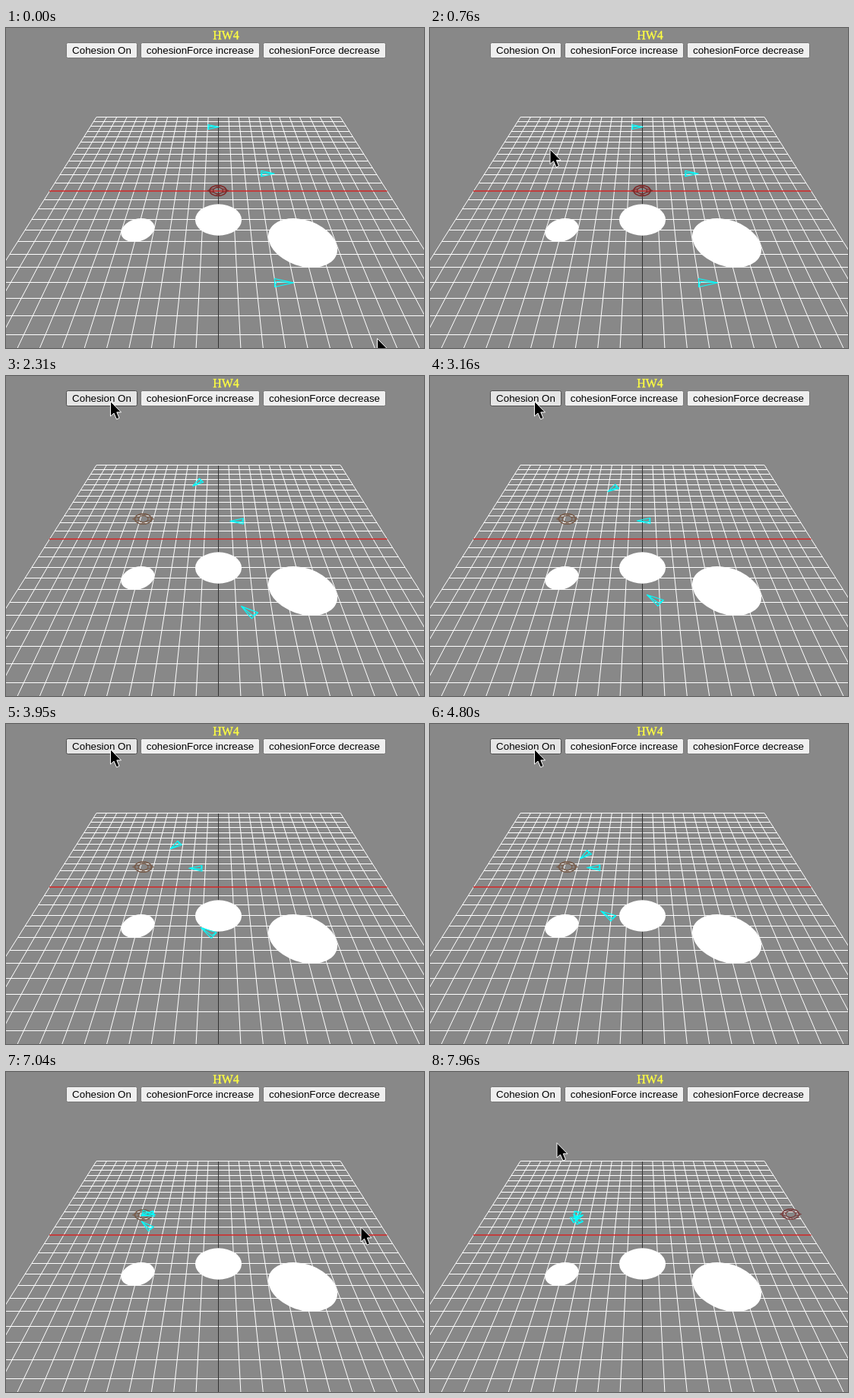
Animation, 550 px wide and 422 px high, one loop 8 s. Source, as an HTML page:

```html
<!DOCTYPE html>
<html>
<head>
<meta charset="utf-8">
<title>HW4</title>
<style>
html, body { margin: 0; width: 100%; height: 100%; overflow: hidden; background: #888; }
svg { display: block; }
.btn text { font: 13.333px "Liberation Sans", Arial, sans-serif; text-anchor: middle; fill: #000; }
.btn rect { fill: #efefef; stroke: #767676; }
.btn.hover rect { fill: #e5e5e5; stroke: #4f4f4f; }
.btn.active rect { fill: #f5f5f5; stroke: #8d8d8d; }
</style>
</head>
<body>
<svg width="550" height="422" viewBox="0 0 550 422">
  <rect width="550" height="422" fill="#888"/>
  <path id="grid" stroke="#fff" fill="none"/>
  <path d="M279.5 118V422" stroke="#333"/>
  <path d="M57 215H501.500" stroke="#d42626" stroke-width="1.5"/>
  <g id="target" fill="none">
    <ellipse rx="11" ry="6.800" stroke-width="1.500"/>
    <ellipse rx="6.500" ry="4.300" stroke-width="1.200"/>
    <path d="M-14 0L-6 -2.500M-14 0L-6 2.500M14 0L6 -2.500M14 0L6 2.500M-3 -7L0 -4L3 -7M-3 7L0 4L3 7"/>
  </g>
  <g fill="#fff">
    <ellipse rx="22.500" ry="14.700" transform="translate(173.300 266.500) rotate(-16)"/>
    <ellipse rx="30.500" ry="20.700" cx="279.500" cy="253"/>
    <ellipse rx="47" ry="30.300" transform="translate(390.500 283.500) rotate(19)"/>
  </g>
  <g id="boids" fill="none" stroke="#0ff" stroke-width="1.100" stroke-linejoin="round"></g>
  <text x="289.500" y="15" text-anchor="middle" fill="#ffff40" stroke="#ffff40" stroke-width=".3"
    font-family="'Liberation Serif', 'Times New Roman', serif" font-size="16">HW4</text>
  <g id="buttons"></g>
  <path id="cursor" d="M0 0V19.500L4.500 15.500L8 23.500L11.500 22L8.300 14.300H14Z" fill="#000" stroke="#fff"/>
</svg>
<script>
const LOOP = 8000, CX = 279.5, HORIZON = -137, DEPTH = 31.4;
const $ = id => document.getElementById(id);

function add(parent, tag, attrs) {
  const el = document.createElementNS("http://www.w3.org/2000/svg", tag);
  for (const k in attrs) el.setAttribute(k, attrs[k]);
  return parent.appendChild(el);
}

// Perspective ground plane, 24 by 24 cells
function project(col, row) {
  const h = 352 * DEPTH / (DEPTH - row);
  return [CX + col / 12 * 222 * h / 352, HORIZON + h];
}
let grid = "";
for (let i = -12; i <= 12; i++) {
  const a = project(i, -12), b = project(i, 12);
  if (i) grid += `M${a}L${b}`;
  const c = project(-12, i), d = project(12, i);
  const y = Math.floor(c[1]) + 0.5;
  if (i) grid += `M${c[0]} ${y}H${d[0]}`;
}
$("grid").setAttribute("d", grid);

const buttons = [
  ["Cohesion On", 79, 173],
  ["cohesionForce increase", 177, 334],
  ["cohesionForce decrease", 338, 500]
].map(([label, l, r]) => {
  const g = add($("buttons"), "g", { class: "btn" });
  add(g, "rect", { x: l + 0.5, y: 19.5, width: r - l - 1, height: 20, rx: 2 });
  add(g, "text", { x: (l + r) / 2, y: 34 }).textContent = label;
  return g;
});

const ticks = [0];
for (const [a, b, n] of [[70, 450, 6], [680, 830, 3], [1080, 1860, 11], [1940, 2700, 11],
  [2780, 3540, 11], [3640, 4410, 11], [4490, 5260, 11], [5330, 6110, 11],
  [6190, 6960, 11], [7040, 7810, 11], [7880, 7960, 2]])
  for (let k = 0; k < n; k++) ticks.push(a + (b - a) * k / (n - 1));

// Linear interpolation through [time, ...values]
function track(keys, t) {
  let i = 0;
  while (i < keys.length - 2 && t >= keys[i + 1][0]) i++;
  const a = keys[i], b = keys[i + 1];
  const u = Math.max(0, Math.min(1, (t - a[0]) / (b[0] - a[0])));
  return a.slice(1).map((v, k) => v + (b[k + 1] - v) * u);
}

const pointer = [[0, 488.5, 409.5], [450, 160, 114], [610, 160, 114], [680, 156, 136],
  [755, 158, 160], [830, 171, 180], [1080, 170, 179], [1460, 118.5, 87.5],
  [1620, 110, 68], [1860, 122, 46], [2010, 137.5, 33.5], [5180, 137.5, 33.5],
  [5260, 139, 35], [5640, 335, 215], [5720, 358, 222], [5880, 384, 200.5],
  [6110, 394, 184], [6500, 436, 161], [6960, 467, 204.5], [7040, 467, 204.5],
  [7270, 474, 188], [7500, 474, 188], [7810, 289, 129], [7960, 167, 93.5]];

// time, x, y, heading in degrees
const flock = [
  [[1000, 273, 130.5, 136], [1460, 263, 133.5, 136], [3160, 240, 149, 144], [4800, 203.5, 173.5, 138],
    [5880, 198, 183, 60], [7040, 188, 187, 10], [7960, 193, 191, 100]],
  [[1000, 344.5, 192, 180], [1460, 326.5, 192, 180], [3160, 281, 191, 180], [4800, 215, 189.5, 180],
    [5880, 199, 184, 200], [7040, 186, 188, 170], [7960, 194, 192, 330]],
  [[1000, 366, 336, 225], [1460, 343, 326, 225], [3160, 294.5, 294, 217], [4800, 233, 251.5, 216],
    [5880, 200.5, 221.5, 219], [7040, 184.5, 202, 225], [7960, 193, 193, 240]]
].map(keys => ({ keys, el: add($("boids"), "path", {}) }));

function boidPath(x, y, deg) {
  const s = (y - HORIZON) / 473, a = deg * Math.PI / 180;
  const at = (f, w) => {
    const px = x + s * (f * Math.cos(a) - w * Math.sin(a));
    const py = y + s * 0.8 * (f * Math.sin(a) + w * Math.cos(a));
    return px.toFixed(2) + " " + py.toFixed(2);
  };
  return `M${at(12.5, 0)}L${at(-12.5, 6.8)}L${at(-12.5, -6.8)}ZL${at(-10, -2)}L${at(-12.5, 6.8)}`;
}

function targetAt(t) {
  if (t < 1080) return [279, 214.5, "#7c2424"];
  if (t < 7340) return [180.5, 188.5, "#775a48"];
  return [474.5, 187.5, "#793c3c"];
}

function draw(ms) {
  let t = 0;
  for (const k of ticks) if (k <= ms + 10) t = k;

  const [cx, cy] = track(pointer, t);
  $("cursor").setAttribute("transform", `translate(${cx} ${cy})`);

  const hover = cx >= 79 && cx < 173 && cy >= 19 && cy < 40;
  const pressed = t > 2800 && t < 2960;
  buttons[0].setAttribute("class", "btn" + (pressed ? " active" : hover ? " hover" : ""));

  const [tx, ty, color] = targetAt(t);
  $("target").setAttribute("transform", `translate(${tx} ${ty})`);
  $("target").setAttribute("stroke", color);

  for (const { keys, el } of flock) {
    const [x, y, deg] = track(keys, t);
    el.setAttribute("d", boidPath(x, y, t < 1080 ? 0 : deg));
  }
}

const start = performance.now();
function loop() {
  draw((performance.now() - start) % LOOP);
  requestAnimationFrame(loop);
}
draw(0);
requestAnimationFrame(loop);
</script>
</body>
</html>
```
